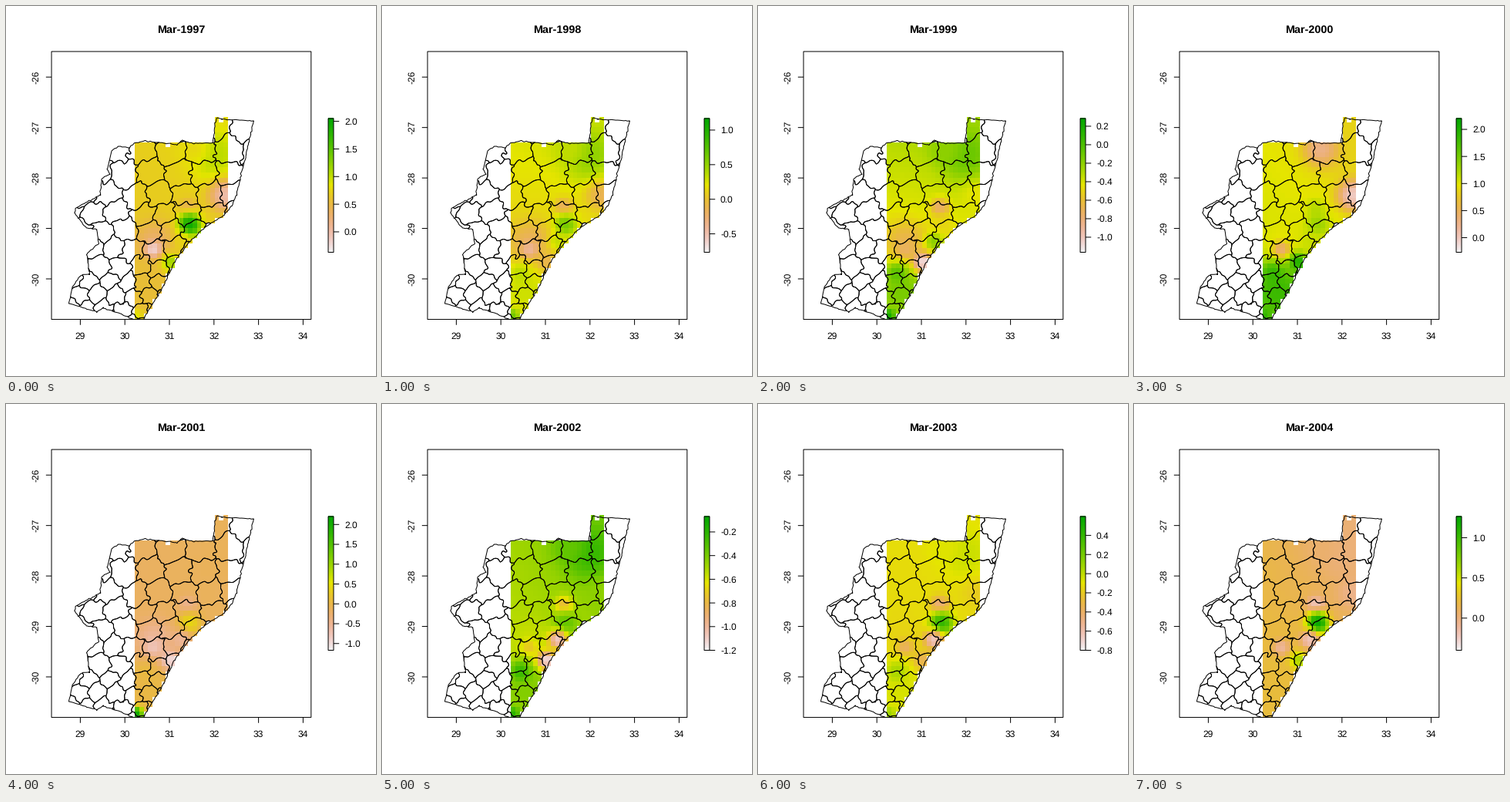
A matplotlib script that plays this animation: 480 by 480 pixels, repeating every 8000 ms.

```python
import colorsys
import math

import matplotlib.pyplot as plt
import numpy as np
from matplotlib.animation import FuncAnimation
from matplotlib.colors import ListedColormap
from matplotlib.patches import Polygon, Rectangle

SIZE, DPI = 480, 80
PX = 72 / DPI  # points per pixel
LEFT, TOP, RIGHT, BOTTOM = 59.04, 59.04, 395.8, 406.56
BAR = (418, 425, 146, 319.5)
COLS, ROWS = 21, 40
GX0, GX1, GY0, GY1 = 167, 287.9, 144.3, 406.3

# Key points of the province outline, clockwise
NORTH = [(137, 188), (146, 182), (160, 184), (167, 178), (180, 175), (222, 180),
         (229, 174), (241, 178), (269, 178), (271, 152), (274, 145), (280, 147)]
COAST = [(321, 149), (315, 178), (299, 245), (293, 259), (282, 272), (258, 287),
         (237, 307), (218, 333), (205, 362), (178, 407)]
WEST = [(165, 407), (150, 400), (126, 392), (118, 397), (82, 386), (86, 365),
        (96, 350), (108, 348), (105, 322), (120, 308), (118, 290), (104, 288),
        (89, 269), (91, 262), (122, 245), (125, 223), (135, 219), (131, 210)]

# Weather sites: x, y, reach
SITES = [(268, 193, 32), (242, 186, 22), (284, 246, 20), (186, 372, 42),
         (192, 306, 26), (236, 262, 12), (238, 284, 15), (228, 306, 12),
         (191, 316, 10), (213, 333, 12), (180, 347, 13), (169, 402, 9)]

plt.rcParams["font.family"] = "Liberation Sans"
plt.rcParams["text.hinting"] = "none"
rng = np.random.default_rng(7)

fig = plt.figure(figsize=(SIZE / DPI, SIZE / DPI), dpi=DPI, facecolor="white")
ax = fig.add_axes([0, 0, 1, 1])
ax.axis("off")


def terrain(n=255):
    """Pale grey through orange and yellow to green."""
    colors = []
    for t in np.linspace(0, 1, n):
        if t < 0.5:
            k = t * 2
            colors.append(colorsys.hsv_to_rgb(k / 6, k, 0.95 - 0.05 * k))
        else:
            k = t * 2 - 1
            colors.append(colorsys.hsv_to_rgb((1 + k) / 6, 1, 0.9 - 0.25 * k))
    return ListedColormap(colors)


CMAP = terrain()


def line(xs, ys):
    return ax.plot(xs, ys, color="black", lw=PX, snap=False,
                   solid_capstyle="butt")[0]


def box(x0, y0, x1, y1):
    return ax.add_patch(Rectangle((x0, y0), x1 - x0, y1 - y0, fc="none",
                                  ec="black", lw=PX, snap=False, zorder=4))


def label(x, y, s, size=12, **kw):
    return ax.text(x, y, s, fontsize=size * PX, va="baseline", **kw)


def cells(z, x0, x1, y0, y1):
    return ax.imshow(z, cmap=CMAP, vmin=0, vmax=1, zorder=1, aspect="auto",
                     interpolation="nearest", extent=(x0, x1, y1, y0))


def roughen(points, step=2.6, amount=0.4):
    """Resample a polyline and give it a little natural wobble."""
    p = np.array(points, float)
    dist = np.r_[0, np.cumsum(np.hypot(*np.diff(p, axis=0).T))]
    s = np.union1d(np.arange(0, dist[-1], step), dist)
    xy = np.column_stack([np.interp(s, dist, p[:, k]) for k in (0, 1)])
    return xy + rng.normal(0, amount, xy.shape)


def district_seeds():
    """Jittered staggered grid whose spacing tightens towards the south."""
    seeds, y, row = [], 158, 0
    while y < 415:
        gap = np.interp(y, [180, 380], [33, 19])
        xs = np.arange(84 + gap * 0.6 * (row % 2), 330, gap * 1.15)
        seeds += [(x, y) for x in xs]
        y += gap * 0.9
        row += 1
    seeds = np.array(seeds)
    return seeds + rng.uniform(-4.5, 4.5, seeds.shape)


def waves(x, y, count=8, amp=0.75):
    total = 0
    for _ in range(count):
        angle, phase = rng.uniform(0, 2 * math.pi, 2)
        k = 2 * math.pi / rng.uniform(7, 22)
        total = total + amp * np.sin(k * (x * np.cos(angle) + y * np.sin(angle)) + phase)
    return total


def draw_districts(outline):
    """Outline every nearest-seed region, bent by small waves."""
    x, y = np.meshgrid(np.arange(80, 325, 1.5), np.arange(142, 409, 1.5))
    wx, wy = x + waves(x, y), y + waves(x, y)
    seeds = district_seeds()
    d = np.array([np.hypot(wx - sx, wy - sy) for sx, sy in seeds])
    owner = d.argmin(axis=0)
    best, second = np.partition(d, 1, axis=0)[:2]
    for i in np.unique(owner):
        margin = d[i] - np.where(owner == i, second, best)
        ring = ax.contour(x, y, margin, [0], colors="black", linewidths=PX, zorder=3)
        ring.set_clip_path(outline)


# Frame and axes
frame = box(LEFT, TOP, RIGHT, BOTTOM)
for i in range(6):
    x = 96.4 + 57.8 * i
    line([x, x], [BOTTOM, BOTTOM + 7.2])
    label(x, 432, str(29 + i), ha="center")
for i in range(5):
    y = 92.2 + 65.45 * i
    line([LEFT - 7.2, LEFT], [y, y])
    label(42, y, str(-26 - i), ha="center", rotation=90, rotation_mode="anchor")

# Map
land_edge = Polygon(roughen(NORTH + COAST + WEST), closed=True, fc="none",
                    ec="black", lw=PX, zorder=3)
ax.add_patch(land_edge)
land_edge.set_clip_path(frame)
draw_districts(land_edge)

# Raster grid, cut off along the coast
cx = GX0 + (np.arange(COLS) + 0.5) * (GX1 - GX0) / COLS
cy = GY0 + (np.arange(ROWS) + 0.5) * (GY1 - GY0) / ROWS
X, Y = np.meshgrid(cx, cy)
U, V = (X - GX0) / (GX1 - GX0), np.clip((Y - 177) / (GY1 - 177), 0, 1)
coast_x, coast_y = np.array(COAST).T
land = X < np.interp(Y, coast_y, coast_x)
land[:5, :18] = False
land[0, 19] = land[5, 7] = False

years = {}


def add_year(year, span, backdrop, *levels):
    """Backdrop holds the nw, ne and south levels; one level per site follows."""
    years[year] = np.array(span), np.array(backdrop), np.array(levels)


def add_between(year):
    """Fill a year with the mean of its neighbours."""
    years[year] = tuple((a + b) / 2 for a, b in zip(years[year - 1], years[year + 1]))


def field(backdrop, levels):
    nw, ne, south = backdrop
    z = (nw + (ne - nw) * U) * (1 - V) + south * V
    for (x, y, reach), level in zip(SITES, levels):
        d = np.hypot(X - x, Y - y) / reach
        z = z + (level - z) * np.exp(-d ** 2.5)
    return np.ma.array(np.clip(z, 0, 1), mask=~land)


add_year(1997, (-0.37, 2.05), (0.44, 0.47, 0.40),
         0.58, 0.47, 0.15, 0.38, 0.28, 0.33, 0.95, 0.45, 0.08, 0.62, 0.38, 0.50)
add_year(1999, (-1.163, 0.283), (0.58, 0.62, 0.38),
         0.74, 0.66, 0.50, 0.70, 0.34, 0.27, 0.46, 0.66, 0.30, 0.05, 0.76, 0.93)
add_year(2000, (-0.27, 2.2), (0.50, 0.45, 0.55),
         0.45, 0.22, 0.10, 0.84, 0.50, 0.58, 0.63, 0.55, 0.27, 0.90, 0.85, 0.86)
add_year(2001, (-1.17, 2.2), (0.29, 0.31, 0.30),
         0.31, 0.30, 0.30, 0.35, 0.18, 0.20, 0.46, 0.18, 0.12, 0.05, 0.36, 0.95)
add_year(2002, (-1.2, -0.07), (0.62, 0.72, 0.54),
         0.86, 0.75, 0.66, 0.68, 0.55, 0.37, 0.74, 0.10, 0.42, 0.05, 0.84, 0.88)
add_year(2004, (-0.4, 1.263), (0.34, 0.25, 0.38),
         0.24, 0.27, 0.21, 0.37, 0.36, 0.10, 0.97, 0.12, 0.18, 0.60, 0.37, 0.37)
add_between(1998)
add_between(2003)

raster = cells(field(*years[1997][1:]), GX0, GX1, GY0, GY1)

# Colour bar
x0, x1, y0, y1 = BAR
cells(np.linspace(1, 0, 255)[:, None], *BAR)
box(x0, y0, x1, y1)
ax.set_xlim(0, SIZE)
ax.set_ylim(SIZE, 0)

title = label(227.4, 35, "", 14.4, weight="bold", ha="center")
marks = [(line([], []), label(439, 0, "")) for _ in range(10)]


def update(i):
    (lo, hi), backdrop, levels = years[1997 + i]
    raster.set_data(field(backdrop, levels))
    title.set_text(f"Mar-{1997 + i}")
    step = 0.2 if hi - lo < 1.5 else 0.5
    first, last = math.ceil(lo / step - 1e-6), math.floor(hi / step + 1e-6)
    for k, (tick, text) in enumerate(marks, first):
        shown = k <= last
        y = y1 - (k * step - lo) / (hi - lo) * (y1 - y0)
        tick.set_data([x1, x1 + 7.2], [y, y])
        tick.set_visible(shown)
        text.set_text(f"{k * step:.1f}")
        text.set_y(y + 4.3)
        text.set_visible(shown)
    return []


anim = FuncAnimation(fig, update, frames=len(years), interval=1000,
                     repeat=True, repeat_delay=0, blit=False)
plt.show()
```
